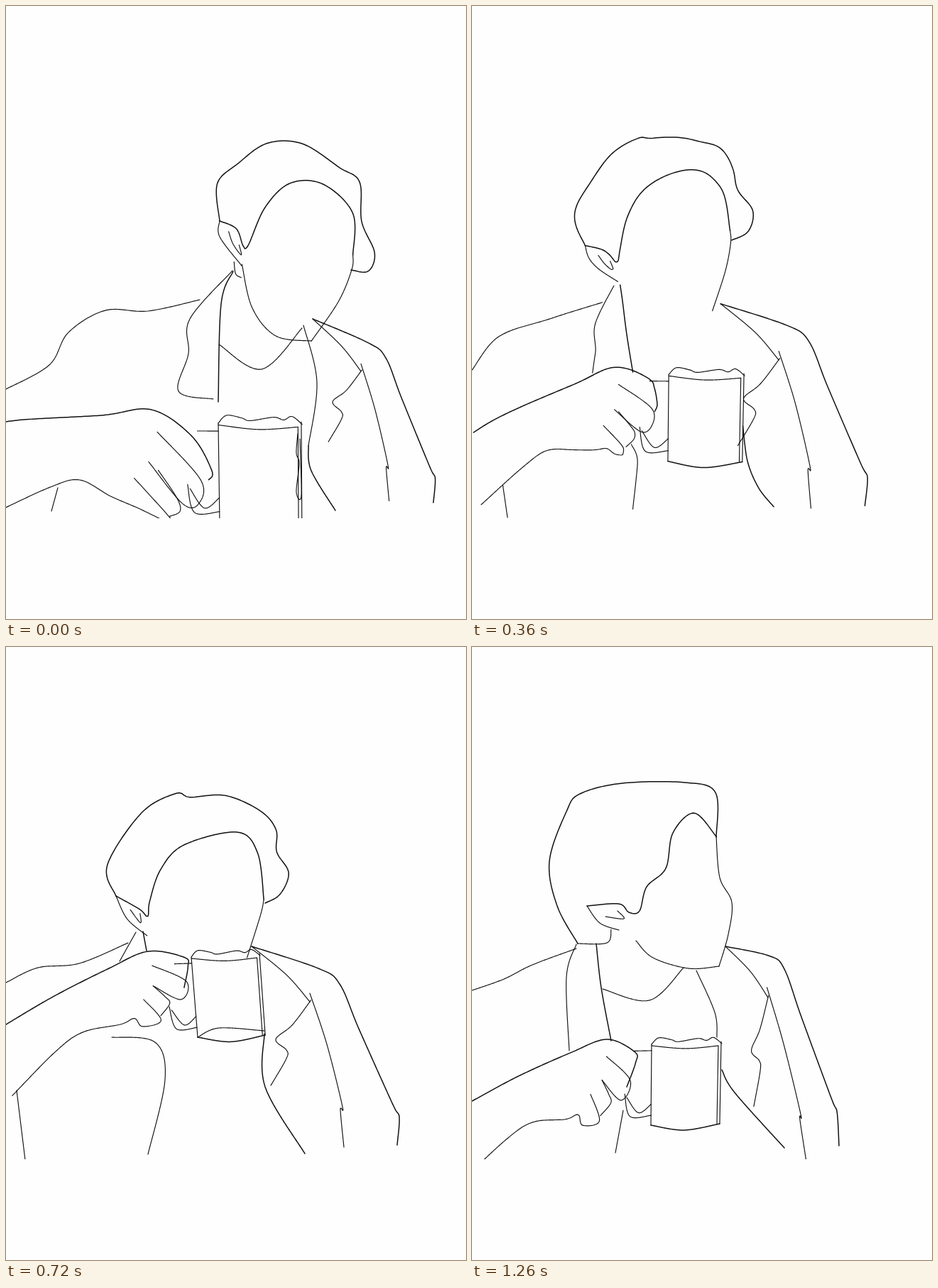
Write an HTML page with a canvas that moves like this. It is 648 px wide and 864 px high and loops after 1.32 s.

```html
<!DOCTYPE html>
<html lang="en">
<head>
<meta charset="utf-8">
<title>Line drawing: a sip from a mug</title>
<style>
html, body { margin: 0; width: 100%; height: 100%; overflow: hidden; background: #fefefe; }
canvas { display: block; width: 648px; height: 864px; }
</style>
</head>
<body>
<canvas id="stage" width="648" height="864"></canvas>
<script>
const LOOP = 1320, STEP = 60, SAMPLES = 120, FLOOR = 722;
const BOLD = new Set(['armTop', 'shoulderR', 'openR', 'lapelIn', 'base', 'hair', 'brow']);
const keys = [0, 240, 480, 720, 900, 1140, 1260].map(time => ({ time, strokes: {} }));

const points = text => text.split(' ').map(p => p.split(',').map(Number));

// Cubic through b and c, with neighbours a and d.
const spline = (a, b, c, d, u) =>
  b + u * ((c - a) / 2 + u * (a - 2.5 * b + 2 * c - d / 2 + u * (1.5 * (b - c) + (d - a) / 2)));

// Evenly spaced points along the smooth curve through pts.
function trace(pts) {
  const at = i => pts[Math.max(0, Math.min(pts.length - 1, i))];
  const dense = [pts[0]], length = [0];
  for (let i = 0; i < pts.length - 1; i++) {
    for (let k = 1; k <= 12; k++) {
      const p = [0, 1].map(c => spline(at(i - 1)[c], at(i)[c], at(i + 1)[c], at(i + 2)[c], k / 12));
      const last = dense.at(-1);
      length.push(length.at(-1) + Math.hypot(p[0] - last[0], p[1] - last[1]));
      dense.push(p);
    }
  }
  let j = 1;
  return Array.from({ length: SAMPLES }, (_, n) => {
    const s = length.at(-1) * n / (SAMPLES - 1);
    while (j < dense.length - 1 && length[j] < s) j++;
    const u = (s - length[j - 1]) / (length[j] - length[j - 1] || 1);
    return [0, 1].map(c => dense[j - 1][c] + u * (dense[j][c] - dense[j - 1][c]));
  });
}

// Affine map that carries three anchor points onto three others.
function affine(from, to) {
  const [a, b, c] = points(from), [A, B, C] = points(to);
  const det = (b[0] - a[0]) * (c[1] - a[1]) - (c[0] - a[0]) * (b[1] - a[1]);
  return ([x, y]) => {
    const u = ((x - a[0]) * (c[1] - a[1]) - (c[0] - a[0]) * (y - a[1])) / det;
    const v = ((b[0] - a[0]) * (y - a[1]) - (x - a[0]) * (b[1] - a[1])) / det;
    return [0, 1].map(i => A[i] + u * (B[i] - A[i]) + v * (C[i] - A[i]));
  };
}

// Poses one drawing by its anchors, from key first to key last.
function rig(drawing, anchors, base, first, last) {
  for (let k = first; k <= last; k++) {
    const map = affine(anchors[base], anchors[k]);
    for (const name in drawing) keys[k].strokes[name] = trace(points(drawing[name]).map(map));
  }
}

// Loose folds, given pose by pose; an empty entry hides the stroke.
function fold(name, ...lines) {
  lines.forEach((line, k) => { if (line) keys[k].strokes[name] = trace(points(line)); });
}

const headAt = ['301,303 486,372 380,465', '187,324 388,316 302,445', '147,349 357,352 268,195',
  '155,351 365,361 280,207', '151,348 363,355 272,203', '128,300 340,478 328,250', '109,302 348,450 313,234'];

rig({
  hair: '187,324 172,276 195,238 230,195 280,176 340,187 373,195 388,246 416,280 413,308 388,316',
  brow: '187,324 213,325 228,344 235,340 247,281 275,235 322,218 373,240 386,295',
  side: '386,295 389,315 380,365 354,432',
  jaw: '354,432 302,445 260,421 232,369',
  ear: '187,324 192,345 232,371',
  earIn: '203,333 213,347 228,357 222,345',
  lobe: '220,370 226,385 235,387'
}, headAt, 1, 0, 1);

rig({
  hair: '151,348 137,305 183,231 231,203 251,208 302,205 352,226 375,252 377,283 395,312 384,342 363,355',
  brow: '151,348 185,366 197,376 199,355 213,310 245,275 320,256 350,285 361,350',
  side: '361,350 357,372 340,432',
  ear: '151,348 168,380 197,403',
  earIn: '172,367 187,385 186,372'
}, headAt, 4, 2, 4);

rig({
  hair: '149,418 120,365 109,302 133,232 152,207 212,192 300,191 343,205 344,268',
  brow: '162,365 207,362 221,374 236,372 246,338 273,312 283,262 313,234 344,267',
  side: '344,267 349,325 366,360 361,405 348,450',
  jaw: '348,450 305,453 255,438 231,414',
  ear: '162,365 180,389 207,399',
  earIn: '188,380 214,383 205,372',
  lobe: '149,418 190,417 196,398'
}, headAt, 6, 5, 6);

const armAt = ['205,569 104,668 290,655', '212,547 122,657 287,600', '190,470 99,587 0,564',
  '200,429 108,543 0,532', '207,434 106,552 0,534', '195,500 100,619 0,593', '190,553 85,670 0,640'];

rig({
  armTop: '0,630 40,608 150,571 212,547 262,565 287,600 283,612',
  armLow: '20,723 85,676 122,657 160,666 195,671 234,678 236,673 190,636',
  fingerA: '219,572 273,615 270,645 250,650 208,611',
  fingerB: '220,618 243,645 247,660 234,670'
}, armAt, 1, 0, 1);

rig({
  armTop: '0,534 70,495 150,457 207,434 257,446 261,460 253,492',
  armLow: '0,643 65,580 106,552 160,543 180,535 190,548 217,540 195,507',
  fingerA: '211,456 257,483 247,510 210,487',
  fingerB: '210,487 225,504 231,515 217,533'
}, armAt, 4, 2, 6);

const mugAt = ['299,588 416,586 301,730', '298,562 413,560 295,697', '257,475 354,474 259,586',
  '261,437 357,432 270,550', '261,438 358,436 267,553', '262,505 361,503 263,620', '253,560 351,556 252,674'];

rig({
  mugL: '262,505 263,620',
  mugR: '361,503 361,620',
  mugSide: '357,509 357,620',
  base: '263,620 310,628 361,620',
  rim: '262,505 272,496 290,499 300,502 328,498 340,501 350,497 362,506',
  rimLow: '262,507 310,512 357,509',
  handleTop: '237,514 262,514',
  handleOut: '225,575 233,607 263,606',
  handleIn: '228,580 245,602 263,590'
}, mugAt, 5, 0, 6);

fold('bottom', '', '', '', '270,550 300,537 364,541', '267,552 310,548 362,548');
fold('drip', '411,603 409,630 413,645 409,685 416,690 414,610', '411,581 404,610 409,630 405,664 411,660');

const coatAt = ['432,441 535,496 602,700', '366,420 488,479 563,699', '343,422 468,470 549,709',
  '346,422 470,475 551,702', '345,421 470,470 550,700', '352,424 455,465 539,702', '357,422 440,454 517,703'];

rig({
  shoulderR: '346,422 440,453 470,475 497,538 545,645 554,662 551,702',
  sleeveR: '428,488 452,560 474,648 471,652 476,705',
  lapelR: '346,422 395,462 428,500',
  flap: '428,500 428,500 403,533 380,553 395,568 395,580 373,618'
}, coatAt, 3, 0, 6);

fold('openUp', '419,450 438,530 426,620', '354,434 375,490 393,550', '', '', '', '', '316,456 342,515 345,550');
fold('openR', '426,620 430,655 464,711', '411,664 438,703', '355,518 356,600 380,665 416,710',
  '364,545 365,620 421,714', '362,549 367,632 426,715', '362,615 372,640 429,713', '352,596 370,628 440,706');
fold('shoulderL', '0,540 61,506 88,460 140,429 200,430 273,414', '0,545 33,477 95,442 207,413',
  '0,480 45,457 107,446 169,422', '0,473 45,452 103,446 172,417', '0,469 48,445 100,443 170,418',
  '0,481 35,461 97,450 160,422', '0,484 45,468 85,448 147,425');
fold('lapelL', '319,373 259,441 257,490 243,543 292,554', '228,388 193,455 201,510 196,550',
  '183,399 155,455 156,480', '183,402 160,443', '183,399 162,446', '168,407 149,455 152,513', '147,419 133,465 137,569');
fold('lapelIn', '320,374 303,420 299,558', '235,387 243,475 255,556', '193,398 203,471',
  '193,401 198,428', '197,400 203,434', '192,423 196,500', '175,418 182,480 196,555');
fold('tee', '300,477 360,512 417,454', '243,474 305,501 354,436', '', '', '',
  '197,480 260,507 302,481', '184,482 250,498 298,452');
fold('openL', '', '243,672 245,710', '204,573 224,610 211,709', '149,550 210,557 224,610 200,715',
  '152,555 212,557 224,610 198,717', '221,600 205,717', '213,653 202,713');
fold('hem', '73,679 64,712', '73,686 67,720', '14,660 32,721', '15,625 27,723', '19,630 28,719', '22,685 33,717');

const names = [...new Set(keys.flatMap(k => Object.keys(k.strokes)))];

// Velocity of one coordinate at key i, from whichever neighbours have the stroke.
function velocity(i, name, n, c) {
  const has = k => keys[k] && keys[k].strokes[name];
  const a = has(i - 1) ? i - 1 : i, b = has(i + 1) ? i + 1 : i;
  return a === b ? 0 : (has(b)[n][c] - has(a)[n][c]) / (keys[b].time - keys[a].time);
}

function strokeAt(name, i, t) {
  const from = keys[i].strokes[name], next = keys[i + 1];
  if (!next) return from;
  const to = next.strokes[name], span = next.time - keys[i].time, u = (t - keys[i].time) / span;
  if (!from || !to) return u < 0.5 ? from : to;
  const w = u * u * (3 - 2 * u), out = u * (1 - u) ** 2 * span, into = u * u * (u - 1) * span;
  return from.map((p, n) => p.map((v, c) =>
    v + w * (to[n][c] - v) + out * velocity(i, name, n, c) + into * velocity(i + 1, name, n, c)));
}

const ctx = document.getElementById('stage').getContext('2d');
ctx.lineCap = ctx.lineJoin = 'round';
ctx.strokeStyle = '#111';
ctx.fillStyle = '#fefefe';

function draw(t) {
  ctx.fillRect(0, 0, 648, 864);
  const i = keys.findLastIndex(k => k.time <= t);
  for (const name of names) {
    const line = strokeAt(name, i, t);
    if (!line) continue;
    ctx.lineWidth = BOLD.has(name) ? 1.5 : 1.15;
    ctx.beginPath();
    line.forEach(([x, y]) => ctx.lineTo(x, y));
    ctx.stroke();
  }
  ctx.fillRect(0, FLOOR, 648, 864 - FLOOR);
}

let shown = -1;
function tick() {
  const t = Math.floor(performance.now() % LOOP / STEP) * STEP;
  if (t !== shown) draw(shown = t);
  requestAnimationFrame(tick);
}
tick();
</script>
</body>
</html>
```
